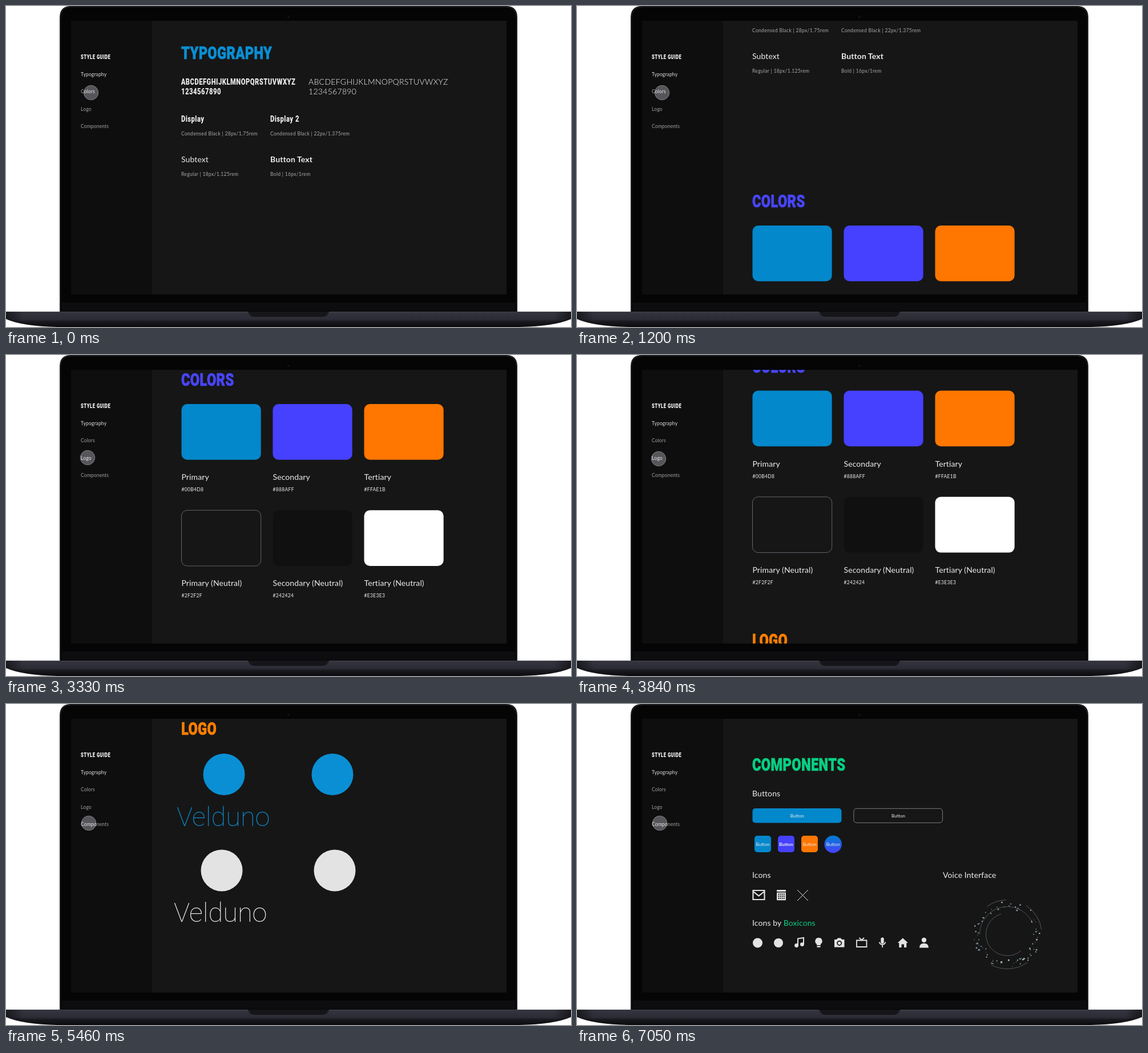
An HTML page that plays this animation: 990x563 px, repeating every 7.08 s.

```html
<!DOCTYPE html>
<html lang="en">
<head>
<meta charset="utf-8">
<title>Style guide</title>
<style>
html, body { margin: 0; width: 100%; height: 100%; overflow: hidden; background: #fff; }
svg { display: block; width: 990px; height: 563px; }
text { font-family: Lato, sans-serif; fill: #ececec; white-space: pre; }
.cond { font-family: Roboto, sans-serif; font-weight: 900; transform-box: fill-box; transform: scaleX(.763); transform-origin: 0 0; }
.title { font-size: 31px; letter-spacing: .45px; fill: currentColor; stroke: currentColor; stroke-width: .7px; }
.head { font-size: 14.7px; letter-spacing: .65px; }
.guide { font-size: 10px; letter-spacing: .7px; fill: #fff; }
.nav { font-size: 8.5px; letter-spacing: .15px; fill: #a0a0a0; }
.label { font-size: 14px; letter-spacing: .1px; }
.light { font-weight: 300; letter-spacing: .3px; fill: #fff; }
.bold { font-weight: 700; }
.note { font-size: 8.5px; letter-spacing: .32px; fill: #a8a8a8; }
.hex { font-size: 8.5px; letter-spacing: .32px; }
.word { font-family: Roboto, sans-serif; font-weight: 100; font-size: 47px; }
.btn { font-size: 8px; text-anchor: middle; }
.line { fill: none; stroke: #e3e3e3; }
.icon { fill: #e3e3e3; }
#cursor { fill: #48484c; stroke: #6e6e72; mix-blend-mode: plus-lighter; }
</style>
</head>
<body>
<svg viewBox="0 0 990 563">
  <defs>
    <clipPath id="screen"><rect x="114" y="26" width="763" height="480"/></clipPath>
    <linearGradient id="base" x1="0" y1="0" x2="0" y2="1">
      <stop offset="0" stop-color="#43444f"/><stop offset=".08" stop-color="#32333c"/>
      <stop offset=".5" stop-color="#2b2c35"/><stop offset=".66" stop-color="#18181e"/><stop offset="1" stop-color="#0b0b0e"/>
    </linearGradient>
    <linearGradient id="sides">
      <stop offset="0" stop-color="#000" stop-opacity=".5"/><stop offset=".03" stop-color="#000" stop-opacity="0"/>
      <stop offset=".97" stop-color="#000" stop-opacity="0"/><stop offset="1" stop-color="#000" stop-opacity=".5"/>
    </linearGradient>
    <linearGradient id="round" x1="0" y1="0" x2="0" y2="1">
      <stop offset="0" stop-color="#007ed0"/><stop offset="1" stop-color="#4541ff"/>
    </linearGradient>
    <path id="foot" d="M0 536H990V549Q960 562 900 563H90Q30 562 0 549Z"/>
  </defs>
  <path d="M94 537V20Q94 0 114 0H876Q896 0 896 20V537Z" fill="#17181c"/>
  <path d="M95.5 537V21Q95.5 1.5 115 1.5H875Q894.5 1.5 894.5 21V537" fill="#050506" stroke="#2a2b32" stroke-width=".8"/>
  <rect x="98" y="520" width="794" height="15" fill="#0d0d10"/>
  <circle cx="495" cy="19" r="2" fill="#121217"/>
  <use href="#foot" fill="url(#base)"/>
  <use href="#foot" fill="url(#sides)"/>
  <path d="M424 536H566Q565 546 554 546H436Q425 546 424 536Z" fill="#15151a"/>
  <path d="M425 538Q427 546 437 546H553Q563 546 565 538" fill="none" stroke="#3b3c46" stroke-width=".8"/>
  <g clip-path="url(#screen)">
    <rect x="114" y="26" width="763" height="480" fill="#161616"/>
    <g id="page"></g>
    <g id="side"></g>
    <circle id="cursor" r="12.7"/>
  </g>
</svg>
<script>
const LOOP = 7080;
const BLUE = '#0388cc', VIOLET = '#4541ff', ORANGE = '#ff7600';
const $ = id => document.getElementById(id);
const text = (x, y, cls, str, extra = '') => `<text x="${x}" y="${y}" class="${cls}" ${extra}>${str}</text>`;
const box = (x, y, w, h, r, fill, extra = '') =>
  `<rect x="${x}" y="${y}" width="${w}" height="${h}" rx="${r}" fill="${fill}" ${extra}/>`;
const disc = (x, y, r, fill) => `<circle cx="${x}" cy="${y}" r="${r}" fill="${fill}"/>`;
const path = (d, cls, width = 1.8) => `<path d="${d}" class="${cls}" stroke-width="${width}"/>`;
const title = (y, str, color) => text(307, y, 'cond title', str, `color="${color}"`);
const section = (y, parts) => `<g transform="translate(0 ${y})">${parts.join('')}</g>`;
const random = n => { const v = Math.sin(n * 12.9898) * 43758.5453; return v - Math.floor(v); };

const typography = [
  title(93.3, 'TYPOGRAPHY', '#0a8fd4'),
  text(307, 138, 'cond head', 'ABCDEFGHIJKLMNOPQRSTUVWXYZ'),
  text(307, 155, 'cond head', '1234567890'),
  text(530, 138, 'label light', 'ABCDEFGHIJKLMNOPQRSTUVWXYZ'),
  text(530, 155, 'label light', '1234567890'),
  text(307, 203, 'cond head', 'Display'),
  text(463, 203, 'cond head', 'Display 2'),
  text(307, 227, 'note', 'Condensed Black | 28px/1.75rem'),
  text(463, 227, 'note', 'Condensed Black | 22px/1.375rem'),
  text(307, 274, 'label', 'Subtext'),
  text(463, 274, 'label bold', 'Button Text'),
  text(307, 298, 'note', 'Regular | 18px/1.125rem'),
  text(463, 298, 'note', 'Bold | 16px/1rem')
];

const swatches = [
  ['Primary', '#00B4D8', BLUE], ['Secondary', '#888AFF', VIOLET], ['Tertiary', '#FFAE1B', ORANGE],
  ['Primary (Neutral)', '#2F2F2F', 'none'], ['Secondary (Neutral)', '#242424', '#101010'], ['Tertiary (Neutral)', '#E3E3E3', '#fff']
].map(([name, hex, fill], i) => {
  const x = 307.5 + i % 3 * 160, y = i < 3 ? 86 : 272.3;
  return box(x, y, 139.2, 97.7, 10, fill, fill === 'none' ? 'stroke="#6c6c78" stroke-width=".9"' : '') +
    text(x, y + 133, 'label', name) + text(x, y + 153, 'hex', hex);
});
const colors = [title(54.3, 'COLORS', '#4845fa'), ...swatches];

const logo = [
  title(54.3, 'LOGO', '#ff7f00'),
  disc(382, 123.5, 36.5, '#0a8fd4'), disc(572, 123.5, 36.5, '#0a8fd4'),
  text(299, 214, 'word', 'Velduno', 'style="fill:#0a8fd4"'),
  disc(378, 292, 36.5, '#e3e3e3'), disc(576, 292, 36.5, '#e3e3e3'),
  text(294, 382, 'word', 'Velduno')
];

const smallButtons = [BLUE, VIOLET, ORANGE].map((fill, i) =>
  box(311 + 41 * i, 231, 29, 29, 5, fill) + text(325.5 + 41 * i, 249, i === 1 ? 'btn bold' : 'btn', 'Button'));

const calculatorKeys = Array.from({ length: 12 }, (_, i) =>
  box(352.3 + i % 4 * 3.2, 332.5 + Math.floor(i / 4) * 3.6, 1.9, 2.1, 0, '#161616')).join('');

const icons = [
  path('M308.5 327H328.5V343H308.5ZM309 329L318.5 336.5L328 329', 'line', 2.2),
  box(350, 326, 16, 3, .5, '#e3e3e3'), box(350, 330.5, 16, 13.8, 1, '#e3e3e3'), calculatorKeys,
  path('M386 326L405 345M405 326L386 345', 'line', 1),
  disc(316.5, 419, 8.5, '#e3e3e3'), disc(353, 419, 8, '#e3e3e3'),
  path('M387 423V411.5L397 410V421', 'line', 2),
  disc(384.6, 423.5, 3.4, '#e3e3e3'), disc(394.5, 421.6, 3.4, '#e3e3e3'),
  path('M423.5 410A6 6 0 0 1 427 421V423H420V421A6 6 0 0 1 423.5 410ZM420.5 424.3H426.5V426.8H420.5Z', 'icon', 0),
  path('M451 413H455L457 410.5H462L464 413H468.5V426.5H451Z', 'icon', 0),
  '<circle cx="459.7" cy="419.4" r="3.6" fill="#e3e3e3" stroke="#161616" stroke-width="1.8"/>',
  path('M490 414.5H507.5V426H490ZM494.5 410L498.7 414L503 410', 'line'),
  box(532.4, 409.5, 5.4, 11, 2.7, '#e3e3e3'),
  path('M529.8 417.5A5.4 5.4 0 0 0 540.4 417.5M535.1 422.5V427', 'line', 1.7),
  path('M570.8 410.5L580 419H577.3V427H573V421.5H568.6V427H564.3V419H561.8Z', 'icon', 0),
  disc(608, 414, 4.2, '#e3e3e3'),
  path('M600 427.5Q600 419.8 608 419.8T616 427.5Z', 'icon', 0)
];

const arc = (r, start, length) =>
  `<circle r="${r}" pathLength="360" stroke-dasharray="${length} ${360 - length}" transform="rotate(${start})" class="line" style="stroke:#5c6064" stroke-width=".8"/>`;
const dots = Array.from({ length: 84 }, (_, i) => {
  const angle = random(i + 1) * 2 * Math.PI, r = 45 + 14 * random(i + 200);
  return disc(r * Math.cos(angle), r * Math.sin(angle), .5 + 1.3 * random(i + 400) ** 2, i % 3 ? '#78909b' : '#a9b8bf');
}).join('');
const voice = `<g transform="translate(754 404)"><g id="rings">
  ${arc(37.5, 50, 203)}${arc(48.5, 180, 152)}${arc(60.5, 234, 34)}${arc(60.5, 303, 49)}${arc(60.5, 54, 64)}
  </g><g id="dots">${dots}</g></g>`;

const components = [
  title(117.3, 'COMPONENTS', '#08cf84'),
  text(307, 162, 'label', 'Buttons'),
  box(307.5, 183, 156, 25.5, 5, BLUE), text(385.7, 199, 'btn', 'Button'),
  box(485, 183.3, 155.5, 25, 5, 'none', 'stroke="#8a8a8a" stroke-width=".9"'), text(563, 199, 'btn', 'Button'),
  ...smallButtons,
  disc(448.7, 246, 15.2, 'url(#round)'), text(448.7, 249, 'btn', 'Button'),
  text(307, 305, 'label', 'Icons'),
  text(641, 305, 'label', 'Voice Interface'),
  text(307, 389, 'label', 'Icons by <tspan fill="#08cf84">Boxicons</tspan>'),
  ...icons, voice
];

$('page').innerHTML = section(0, typography) + section(480, colors) + section(960, logo) + section(1378, components);
$('side').innerHTML = box(114, 26, 142, 480, 0, '#0e0e0e') + text(131, 93, 'cond guide', 'STYLE GUIDE') +
  ['Typography', 'Colors', 'Logo', 'Components'].map((name, i) =>
    text(131, 122.5 + 30.6 * i, 'nav', name, i ? '' : 'style="fill:#dcdcdc"')).join('');

// Eased progress from 0 to 1 between two times
const ease = (t, from, to) => {
  const p = Math.min(1, Math.max(0, (t - from) / (to - from)));
  return (1 - Math.cos(Math.PI * p)) / 2;
};

function draw() {
  const t = performance.now() % LOOP;
  const scroll = 480 * ease(t, 1020, 1450) + 480 * ease(t, 3780, 4210) + 418 * ease(t, 6053, 6493);
  const toLogo = ease(t, 1950, 2750), settle = ease(t, 3400, 3700), toComponents = ease(t, 4480, 5040);
  $('page').setAttribute('transform', `translate(0 ${-scroll})`);
  $('cursor').setAttribute('cx', 149 - 6 * toLogo + 2 * toComponents);
  $('cursor').setAttribute('cy', 152 + 28 * toLogo + 2 * settle + 27 * toComponents);
  const turn = (t - 7050) * .02;
  $('rings').setAttribute('transform', `rotate(${turn})`);
  $('dots').setAttribute('transform', `rotate(${-turn})`);
  requestAnimationFrame(draw);
}
draw();
</script>
</body>
</html>
```
